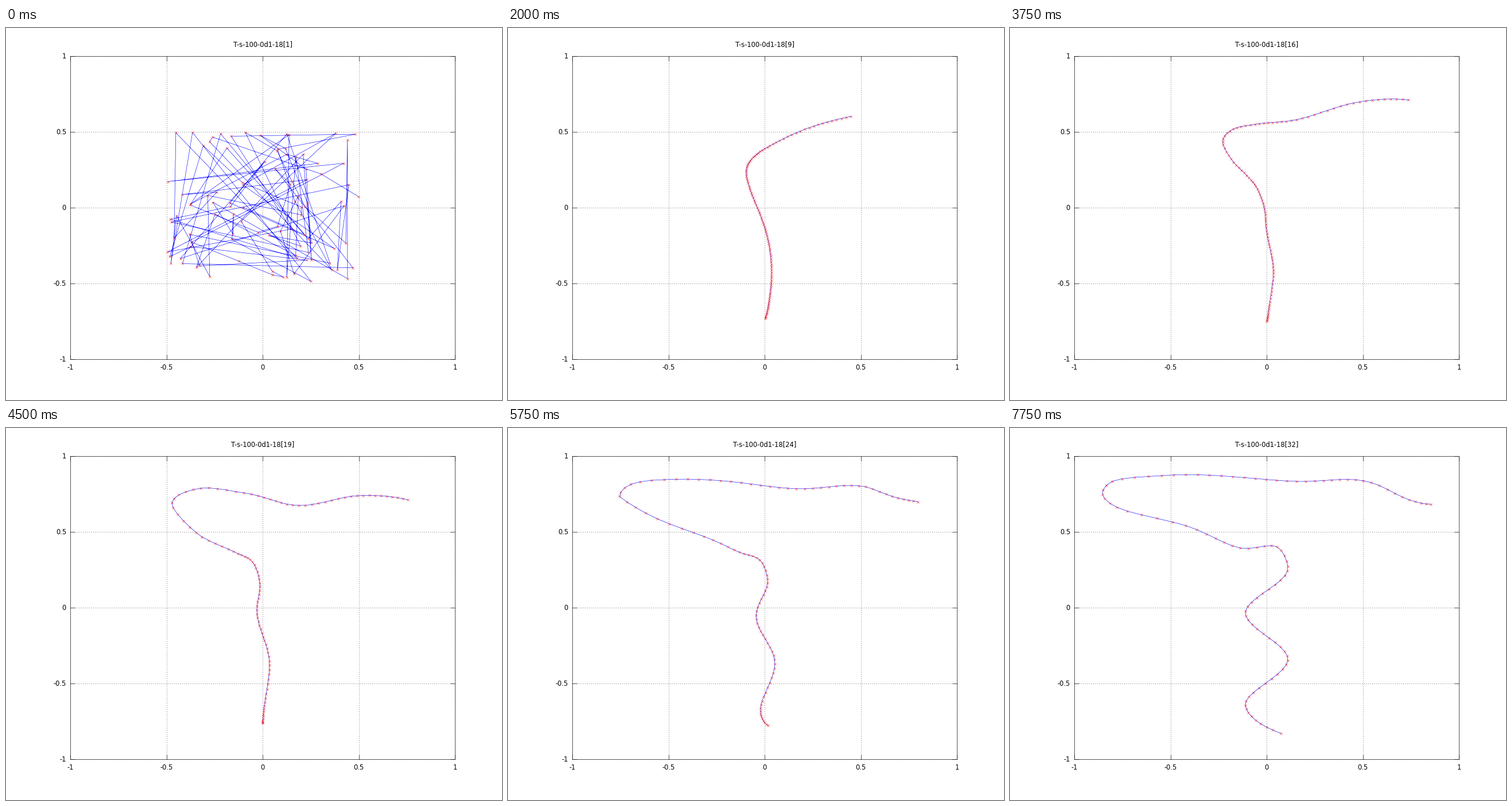
A matplotlib script for the animation above (8 s loop, 864x648 px).

```python
import numpy as np
import matplotlib.pyplot as plt
from matplotlib.animation import FuncAnimation

W, H, DPI = 864, 648, 72
LEFT, RIGHT = 0.13 * W, 0.905 * W
TOP, BOTTOM = 0.075 * H, 0.89 * H
FRAMES, INTERVAL = 32, 250
NODES = np.arange(100)

plt.rcParams["font.family"] = "DejaVu Sans"
plt.rcParams["font.size"] = 11.5


def to_px(u, v):
    """Data in -1..1 to stage pixels."""
    return (LEFT + (RIGHT - LEFT) * (u + 1) / 2,
            BOTTOM - (BOTTOM - TOP) * (v + 1) / 2)


def curve(*points):
    """Smooth chain of nodes through (node, x, y) points."""
    keys, *axes = np.array(points, float).T
    i = np.clip(np.searchsorted(keys, NODES, side="right") - 1, 0, len(keys) - 2)
    h = keys[i + 1] - keys[i]
    s = (NODES - keys[i]) / h
    chain = []
    for v in axes:
        m = np.gradient(v, keys, edge_order=2)
        chain.append((1 + 2 * s) * (1 - s) ** 2 * v[i]
                     + s ** 2 * (3 - 2 * s) * v[i + 1]
                     + h * s * (1 - s) * ((1 - s) * m[i] - s * m[i + 1]))
    return np.array(chain)


def per_node(nodes, values):
    return np.interp(NODES, nodes, values)


def bias(u, k):
    """Ease that runs early for k < 1 and late for k > 1."""
    return u / (u + (1 - u) * k)


rng = np.random.default_rng(18)
scatter = np.array(to_px(*rng.uniform(-0.5, 0.5, (2, len(NODES)))))

bend = curve((0, 436, 214), (5, 427, 218), (12, 416, 228), (20, 413, 245),
             (30, 419, 274), (42, 434, 317), (56, 455, 368), (69, 461, 413),
             (82, 457, 463), (99, 448, 507))

right_arm = curve((0, 670, 127), (9, 579, 148), (18, 490, 180), (27, 434, 200),
                  (33, 411, 215), (37, 407, 228), (42, 411, 250),
                  (54, 432, 306), (66, 451, 362), (78, 459, 425),
                  (90, 454, 479), (99, 448, 506))

both_arms = curve((0, 700, 125), (9, 612, 118), (18, 510, 135), (27, 414, 113),
                  (32, 339, 105), (37, 289, 130), (42, 331, 182),
                  (48, 396, 215), (54, 429, 233), (60, 442, 270),
                  (67, 437, 317), (81, 459, 413), (90, 450, 484),
                  (99, 447, 514))

# The stem ends up as a regular wave
wave = [(60 + 10.4 * k, 447 + 37 * (-1) ** k, 241 + 81 * k) for k in range(4)]
full = curve((0, 733, 133), (4, 695, 125), (9, 629, 95), (18, 499, 93),
             (30, 264, 83), (34, 178, 93), (36.5, 161, 112), (40, 186, 138),
             (45, 306, 170), (51, 401, 209), (56, 465, 207),
             *wave, (99, 472, 532))

# The first ordered chain is a flatter, shorter bend
flat = bend * [[0.5], [0.93]] + [[223.5], [40]]

# Stages: first step, last step, poses, lateness of each node
STAGES = [
    (2, 5, flat, bend, 1),
    (5, 12, bend, right_arm, per_node([0, 40], [0.6, 1])),
    (12, 19, right_arm, both_arms, per_node([0, 37, 99], [0.33, 3, 1])),
    (19, 32, both_arms, full, per_node([0, 9, 37, 57], [0.8, 0.3, 0.22, 2])),
]


def chain_at(step):
    if step == 1:
        return scatter
    for first, last, a, b, late in STAGES:
        if step <= last:
            return a + (b - a) * bias((step - first) / (last - first), late)


fig = plt.figure(figsize=(W / DPI, H / DPI), dpi=DPI, facecolor="white")
ax = fig.add_axes([0, 0, 1, 1])
ax.set_xlim(0, W)
ax.set_ylim(H, 0)
ax.axis("off")

DOTS = dict(color="0.4", lw=0.8, ls=(0, (1.5, 3)), zorder=1)
EDGE = dict(color="black", lw=0.6, zorder=2)

for value in np.linspace(-1, 1, 5):
    x, y = to_px(value, value)
    ax.plot([x, x], [BOTTOM, TOP], **DOTS)
    ax.plot([LEFT, RIGHT], [y, y], **DOTS)
    for edge, inward in ((LEFT, 8), (RIGHT, -8)):
        ax.plot([edge, edge + inward], [y, y], **EDGE)
    for edge, inward in ((TOP, 8), (BOTTOM, -8)):
        ax.plot([x, x], [edge, edge + inward], **EDGE)
    ax.text(x, 595, f"{value:g}", ha="center", va="baseline")
    ax.text(105, y + 4.2, f"{value:g}", ha="right", va="baseline")

ax.plot([LEFT, RIGHT, RIGHT, LEFT, LEFT],
        [TOP, TOP, BOTTOM, BOTTOM, TOP], **EDGE)

title = ax.text((LEFT + RIGHT) / 2, 32, "", ha="center", va="baseline")
line, = ax.plot([], [], color="blue", lw=0.6, zorder=3)
marks, = ax.plot([], [], "x", color="red", ms=4.5, mew=0.5, zorder=4)


def update(frame):
    step = frame + 1
    x, y = chain_at(step)
    line.set_data(x, y)
    marks.set_data(x, y)
    title.set_text(f"T-s-100-0d1-18[{step}]")
    return line, marks, title


anim = FuncAnimation(fig, update, frames=FRAMES, interval=INTERVAL,
                     repeat=True, repeat_delay=0, blit=False)
plt.show()
```
